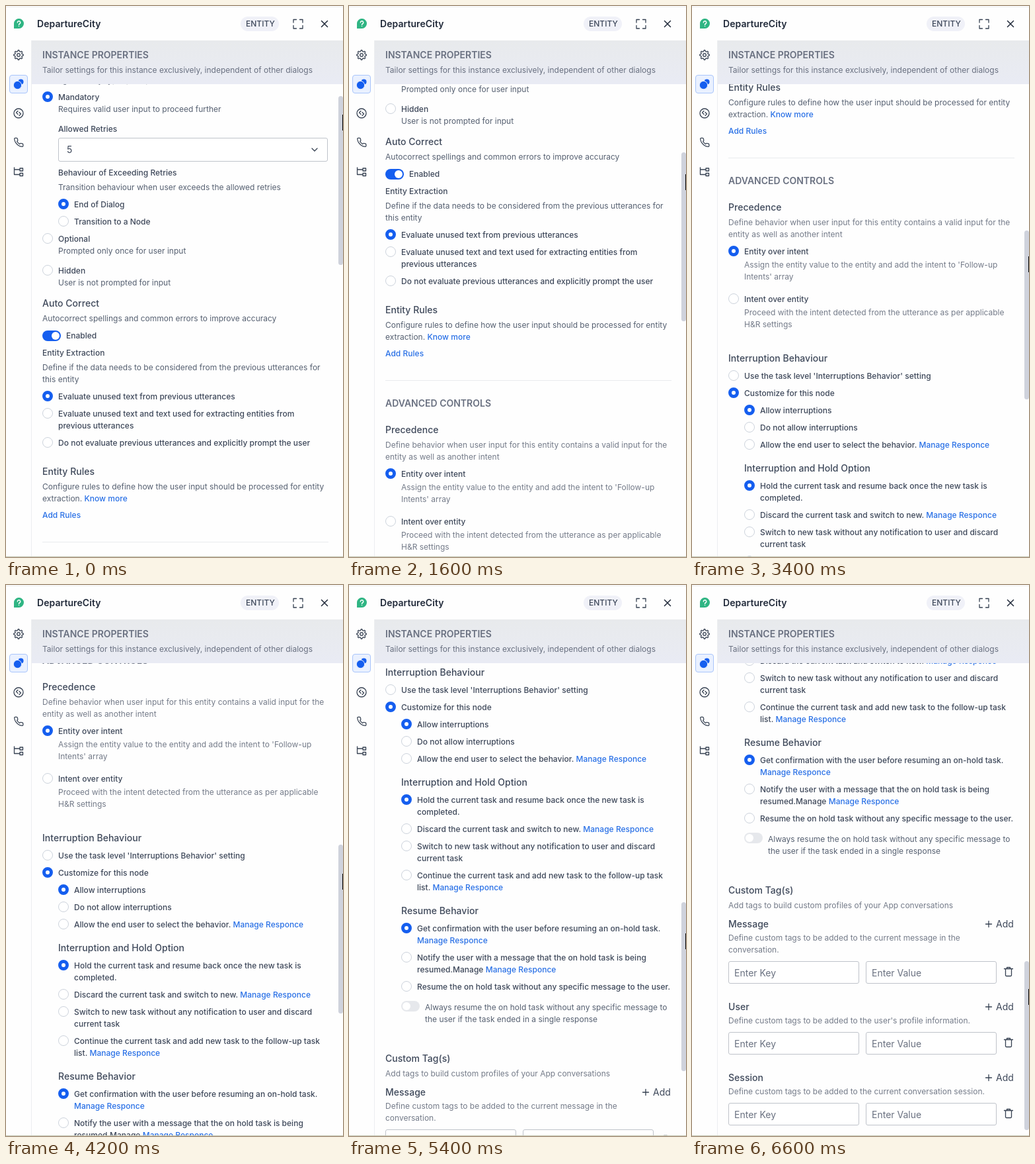
Write an HTML page that moves like this. It is 510 by 832 pixels and loops after 6.8 s.

```html
<!DOCTYPE html>
<html lang="en">
<head>
<meta charset="utf-8">
<title>Instance properties</title>
<style>
@property --y { syntax: "<integer>"; inherits: true; initial-value: 0; }
@property --c { syntax: "<integer>"; inherits: true; initial-value: 0; }
* { box-sizing: border-box; }
html, body { margin: 0; width: 100%; height: 100%; overflow: hidden; }
body {
  position: relative; background: #fefefe; color: #3e485a;
  font: 400 12px/18px Inter, sans-serif;
  animation: scroll 6.8s infinite;
}
/* one step per 200 ms */
@keyframes scroll {
  0% { --y: 0; --c: 0; animation-timing-function: steps(4); }
  11.7647% { --y: 115; --c: 42; animation-timing-function: steps(4); }
  23.5294% { --y: 244; --c: 90; animation-timing-function: steps(5); }
  38.2352% { --y: 429; --c: 161; animation-timing-function: steps(4); }
  50% { --y: 580; --c: 214; animation-timing-function: steps(7); }
  70.5882% { --y: 842; --c: 316; animation-timing-function: steps(5); }
  85.2941% { --y: 1072; --c: 392; animation-timing-function: steps(4); }
  97.0588%, 100% { --y: 1234; --c: 446; }
}
body > *, #list > * { position: absolute; white-space: nowrap; }
svg { fill: none; stroke: #364152; stroke-width: 1.3; stroke-linecap: round; stroke-linejoin: round; overflow: visible; }

#top { left: 0; top: 1px; width: 510px; height: 1px; background: #f0f1f2; }
#title { left: 47px; top: 18px; font-size: 14px; font-weight: 600; letter-spacing: .005em; color: #202939; }
#pill {
  left: 355px; top: 16px; width: 58px; height: 22px; padding-left: 8px; border-radius: 11px;
  background: #f0f1f8; font-weight: 500; line-height: 22px;
}
#side { left: 38px; top: 52px; width: 1px; height: 780px; background: #eceef0; }
#tab { left: 5px; top: 104px; width: 28px; height: 28px; border: 1px solid #a9c5fb; border-radius: 4px; background: #eaf1ff; }
#bar { left: 39px; top: 52px; width: 471px; height: 66px; background: linear-gradient(#e8eaec, #e9ebf4); color: #697080; }
#bar b { position: absolute; left: 16px; top: 13px; font-size: 14px; font-weight: 600; }
#bar span { position: absolute; left: 16px; top: 36px; }
#view { left: 0; top: 118px; width: 510px; height: 714px; overflow: hidden; }
#list { position: absolute; left: 0; top: -118px; width: 510px; height: 2070px; transform: translateY(calc(var(--y) * -1px)); }
#thumb { left: 503px; top: calc(136px + var(--y) * .35px); width: 7px; height: 255px; border-radius: 4px; background: #cfd2dc; }
#beam { left: 509px; top: calc(164px + var(--c) * 1px); width: 1px; height: 24px; background: #000; }
#base { left: 0; top: 831px; width: 510px; height: 1px; background: #c6c9b6; }
#icons { left: 0; top: 0; }

.desc { color: #566071; }
.soft { color: #747b89; }
.label { font-weight: 500; letter-spacing: .0015em; }
.head { font-size: 14px; font-weight: 500; letter-spacing: .002em; }
.caps { font-size: 14px; font-weight: 600; color: #697080; }
.big { font-size: 14px; }
.hint { font-size: 14px; color: #6a7180; }
a { color: #2970e6; }
.label a, a.label { font-weight: 500; }
.radio { width: 16px; height: 16px; border: 1px solid #cdd3dc; border-radius: 50%; background: #fff; }
.radio.on { border: 5px solid #155eef; }
.toggle { width: 28px; height: 16px; border-radius: 8px; background: #e6e8ec; }
.toggle::after { content: ""; position: absolute; left: 2px; top: 2px; width: 12px; height: 12px; border-radius: 50%; background: #fff; }
.toggle.on { background: #155eef; }
.toggle.on::after { left: 14px; }
.box { border: 1px solid #bfc3ca; border-radius: 3px; background: #fff; }
.rule { width: 433px; height: 1px; background: #e9ebee; }
</style>
</head>
<body>
<div id="view"><div id="list"></div></div>
<div id="top"></div>
<div id="title">DepartureCity</div>
<div id="pill">ENTITY</div>
<div id="side"></div>
<div id="tab"></div>
<div id="bar"><b>INSTANCE PROPERTIES</b><span>Tailor settings for this instance exclusively, independent of other dialogs</span></div>
<svg id="icons" width="510" height="270">
  <path d="M12 34V26.500a7.500 7.500 0 1 1 7.500 7.500Z" fill="#2fb583" stroke="none"/>
  <path d="M17.300 25a2.200 2.200 0 1 1 3 2q-.8 .4-.8 1.400M19.500 30.500v.1" stroke="#fff" stroke-width="1.400"/>
  <path d="M435 25v-4.500h4.500M444.500 20.500h4.500v4.500M449 29.500v4.500h-4.500M439.500 34h-4.500v-4.500" stroke-width="1.300"/>
  <path d="M477.500 22.500l9 9m0-9l-9 9" stroke="#202939" stroke-width="1.500"/>
  <path id="gear"/>
  <circle cx="19" cy="74" r="2.300"/>
  <circle cx="22.500" cy="114.500" r="4" fill="#155eef" stroke="none"/>
  <circle cx="17.500" cy="119.500" r="6.200" fill="#155eef" stroke="#eaf1ff" stroke-width="1"/>
  <circle cx="19" cy="162" r="7"/>
  <path d="M18 158.500l-2.500 2.500 2.500 2.500M20 160.500l2.500 2.500-2.500 2.500"/>
  <path transform="translate(11.300 198) scale(.66)" stroke-width="1.900" d="M22 16.900v3a2 2 0 0 1-2.200 2 19.800 19.800 0 0 1-8.600-3.100 19.500 19.500 0 0 1-6-6 19.800 19.800 0 0 1-3.100-8.700A2 2 0 0 1 4.100 2h3a2 2 0 0 1 2 1.700c.1 1 .4 1.900.7 2.800a2 2 0 0 1-.5 2.100L8.100 9.900a16 16 0 0 0 6 6l1.300-1.300a2 2 0 0 1 2.100-.4c.9.300 1.800.6 2.800.7a2 2 0 0 1 1.700 2z"/>
  <path d="M12.500 244v10.500H21M12.500 247H21M21 245h4.500v4H21zM21 252.500h4.500v4H21z"/>
</svg>
<div id="thumb"></div>
<div id="beam"></div>
<div id="base"></div>
<script>
const list = document.getElementById('list');

function put(cls, x, top, html = '', size) {
  const el = document.createElement('div');
  el.className = cls;
  el.style.left = x + 'px';
  el.style.top = top + 'px';
  if (size) [el.style.width, el.style.height] = size.map(n => n + 'px');
  el.innerHTML = html;
  list.append(el);
}
// y is the middle of the first line
const text = (cls, x, y, html) => put(cls, x, y - 9, html);
const icon = (x, y, d) => put('', x, y, `<svg width="1" height="1" style="display:block"><path d="${d}"/></svg>`);
const radio = (x, y, html, on) => {
  put(on ? 'radio on' : 'radio', x, y - 8);
  text('label', x + 24, y + 1, html);
};
const more = '<a>Manage Responce</a>';

text('desc', 55, 112, 'Configure entity type, prompts and how the user is asked for it');
radio(55, 137, 'Mandatory', true);
text('desc', 79, 156, 'Requires valid user input to proceed further');
text('label', 79, 186, 'Allowed Retries');
put('box', 79, 199, '', [408, 36]);
text('big', 92, 217, '5');
icon(467, 217, 'M-4-2L0 2 4-2');
text('label', 79, 252, 'Behaviour of Exceeding Retries');
text('desc', 79, 274, 'Transition behaviour when user exceeds the allowed retries');
radio(79, 299, 'End of Dialog', true);
radio(79, 325, 'Transition to a Node');
radio(55, 351, 'Optional');
text('desc', 79, 370, 'Prompted only once for user input');
radio(55, 399, 'Hidden');
text('desc', 79, 418, 'User is not prompted for input');

text('head', 55, 449, 'Auto Correct');
text('desc', 55, 472, 'Autocorrect spellings and common errors to improve accuracy');
put('toggle on', 55, 490);
text('label', 91, 498, 'Enabled');
text('label', 55, 524, 'Entity Extraction');
text('desc', 55, 546, 'Define if the data needs to be considered from the previous utterances for<br>this entity');
radio(55, 589, 'Evaluate unused text from previous utterances', true);
radio(55, 615, 'Evaluate unused text and text used for extracting entities from<br>previous utterances');
radio(55, 659, 'Do not evaluate previous utterances and explicitly prompt the user');

text('head', 55, 703, 'Entity Rules');
text('desc', 55, 726, 'Configure rules to define how the user input should be processed for entity<br>extraction. <a class="label">Know more</a>');
text('label', 55, 769, '<a>Add Rules</a>');
put('rule', 55, 809);

text('caps', 55, 844, 'ADVANCED CONTROLS');
text('head', 55, 884, 'Precedence');
text('soft', 55, 907, 'Define behavior when user input for this entity contains a valid input for the<br>entity as well as another intent');
radio(55, 950, 'Entity over intent', true);
text('soft', 79, 971, "Assign the entity value to the entity and add the intent to 'Follow-up<br>Intents' array");
radio(55, 1022, 'Intent over entity');
text('soft', 79, 1043, 'Proceed with the intent detected from the utterance as per applicable<br>H&amp;R settings');

text('head', 55, 1112, 'Interruption Behaviour');
radio(55, 1138, "Use the task level 'Interruptions Behavior' setting");
radio(55, 1164, 'Customize for this node', true);
radio(79, 1190, 'Allow interruptions', true);
radio(79, 1216, 'Do not allow interruptions');
radio(79, 1242, `Allow the end user to select the behavior. ${more}`);

text('head', 79, 1278, 'Interruption and Hold Option');
radio(79, 1304, 'Hold the current task and resume back once the new task is<br>completed.', true);
radio(79, 1348, `Discard the current task and switch to new. ${more}`);
radio(79, 1374, 'Switch to new task without any notification to user and discard<br>current task');
radio(79, 1418, `Continue the current task and add new task to the follow-up task<br>list. ${more}`);

text('head', 79, 1472, 'Resume Behavior');
radio(79, 1498, `Get confirmation with the user before resuming an on-hold task.<br>${more}`, true);
radio(79, 1542, `Notify the user with a message that the on hold task is being<br>resumed.Manage ${more}`);
radio(79, 1586, 'Resume the on hold task without any specific message to the user.');
put('toggle', 79, 1608);
text('desc', 115, 1618, 'Always resume the on hold task without any specific message to<br>the user if the task ended in a single response');

text('head', 55, 1695, 'Custom Tag(s)');
text('soft', 55, 1718, 'Add tags to build custom profiles of your App conversations');

function tags(y, name, html, boxTop) {
  text('head', 55, y, name);
  icon(449, y, 'M-4.500 0h9M0-4.500v9');
  text('big', 460, y, 'Add');
  text('soft', 55, y + 21, html);
  ['Key', 'Value'].forEach((word, i) => {
    const x = 55 + 208 * i;
    put('box', x, boxTop, '', [198, 34]);
    text('hint', x + 9, boxTop + 18, 'Enter ' + word);
  });
  icon(479, boxTop + 16, 'M-6.500-4.500h13M-2.500-4.500v-2h5v2M-4.500-4.500v9.500q0 1.500 1.500 1.500h6q1.500 0 1.500-1.500v-9.500');
}
tags(1746, 'Message', 'Define custom tags to be added to the current message in the<br>conversation.', 1802);
tags(1871, 'User', "Define custom tags to be added to the user's profile information.", 1909);
tags(1978, 'Session', 'Define custom tags to be added to the current conversation session.', 2016);

// eight-toothed gear outline
const teeth = Array.from({ length: 32 }, (_, i) => {
  const a = (i - .5) * Math.PI / 16, r = i % 4 < 2 ? 7.3 : 5.5;
  return `${(19 + r * Math.cos(a)).toFixed(2)} ${(74 + r * Math.sin(a)).toFixed(2)}`;
});
document.getElementById('gear').setAttribute('d', `M${teeth.join('L')}Z`);
</script>
</body>
</html>
```
